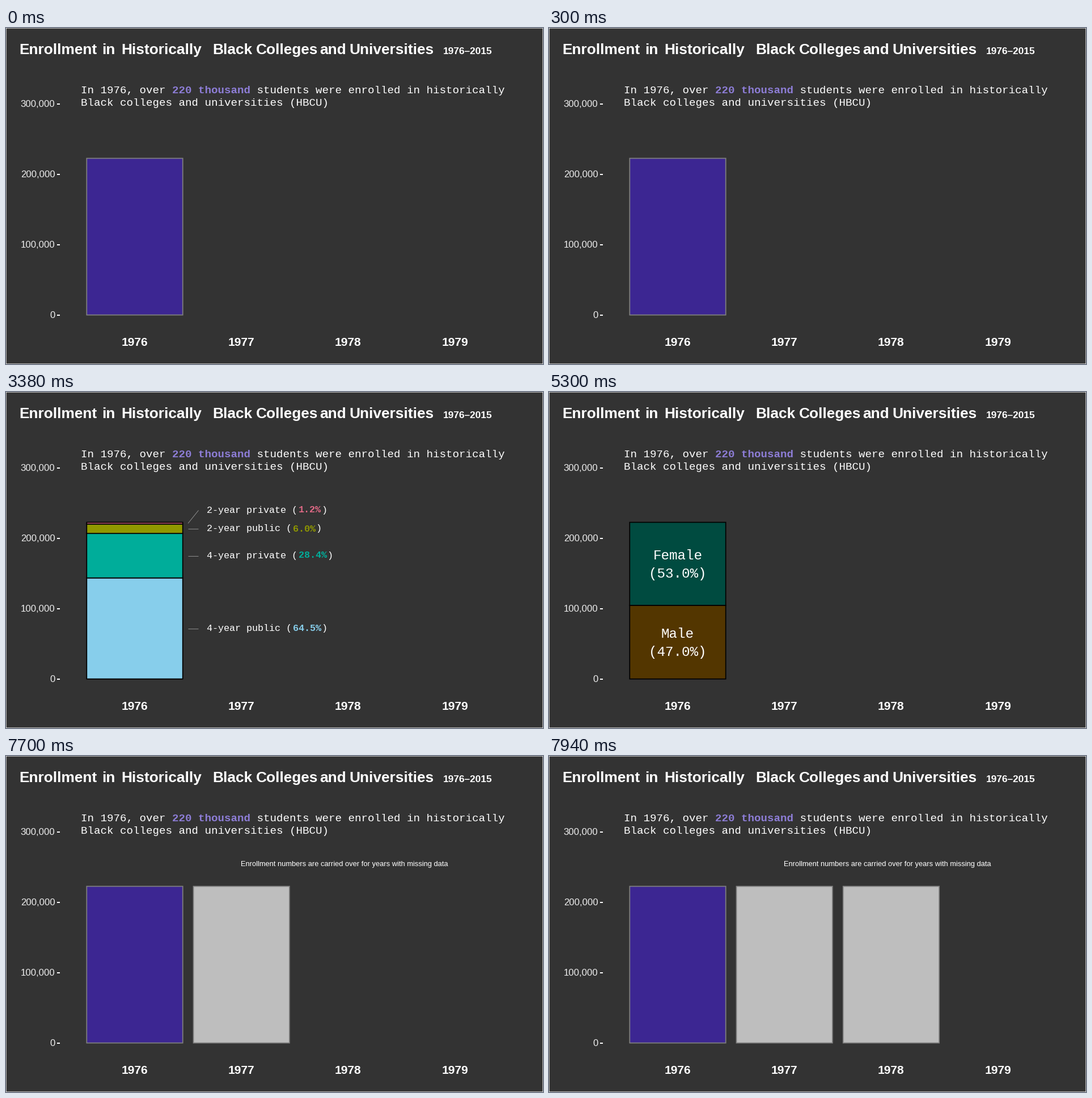
Write a matplotlib script that moves like this. It is 947 by 592 pixels and loops after 8000 ms.

```python
import matplotlib.pyplot as plt
from matplotlib.animation import FuncAnimation
from matplotlib.patches import Rectangle

W, H, DPI = 947, 592, 64
STEP, LOOP = 20, 8000          # ms
MONO, SANS = "Liberation Mono", "Liberation Sans"
WHITE, GREY, PURPLE = "#ffffff", "#7f7f7f", "#3c2692"
BASE, UNIT = 505.6, 124.0      # y of zero, pixels per 100,000
TOTAL = 276.0                  # bar height for 1976
FIRST, PITCH = 227.0, 188.2
BAR_W = 0.9 * PITCH

fig = plt.figure(figsize=(W / DPI, H / DPI), dpi=DPI, facecolor="#333333")
ax = fig.add_axes([0, 0, 1, 1])
ax.set_xlim(0, W)
ax.set_ylim(H, 0)
ax.axis("off")


def text(x, y, s, size, font=SANS, color=WHITE, bold=False, ha="left"):
    return ax.text(x, y, s, fontsize=size * 72 / DPI, family=font, color=color,
                   weight="bold" if bold else "normal", ha=ha, va="baseline")


def mono(x, y, size, before, strong, after, color):
    """One monospaced line with a bold coloured run inside it."""
    step = size * 0.6001
    x2 = x + len(before) * step
    x3 = x2 + len(strong) * step
    return [text(x, y, before, size, MONO),
            text(x2, y, strong, size, MONO, color, True),
            text(x3, y, after, size, MONO)]


def line(xs, ys, color, width):
    return ax.plot(xs, ys, color=color, lw=width * 72 / DPI,
                   solid_capstyle="butt")[0]


def bar(slot, low, high, fill, edge):
    """Bar piece; low and high are shares of the 1976 total."""
    x = FIRST + slot * PITCH - BAR_W / 2
    box = Rectangle((x, BASE - high * TOTAL), BAR_W, (high - low) * TOTAL,
                    fc=fill, ec=edge, lw=1.75 * 72 / DPI, joinstyle="miter",
                    snap=False)
    return ax.add_patch(box)


def draw_base():
    ax.add_patch(Rectangle((0, 0), W, H, fill=False, ec=WHITE,
                           lw=1.3 * 72 / DPI, snap=False))
    title = "Enrollment in Historically Black Colleges and Universities"
    starts = (23.5, 169, 203.5, 364, 440.5, 553.5, 605)
    for x, word in zip(starts, title.split()):
        text(x, 46, word, 26.2, bold=True)
    text(770.5, 46, "1976–2015", 17.2, bold=True)

    mono(132.5, 115, 19.1, "In 1976, over ", "220 thousand",
         " students were enrolled in historically", "#8d7dd6")
    text(132.5, 137, "Black colleges and universities (HBCU)", 19.1, MONO)

    for k in range(4):
        y = BASE - k * UNIT
        text(86.5, y + 5.8, f"{k * 100000:,}", 16.8, color="#ebebeb", ha="right")
        line([90, 95], [y, y], WHITE, 2)
        text(FIRST + k * PITCH, 559.5, str(1976 + k), 21, bold=True, ha="center")


def draw_types():
    parts = [("4-year public", 64.5, "#87ceeb", 416.5, 421),
             ("4-year private", 28.4, "#00ad9a", 288.5, 292.5),
             ("2-year public", 6.0, "#909800", 241.0, 245.5),
             ("2-year private", 1.2, "#e16a86", 208.5, 212.5)]
    out, low = [], 0.0
    for name, pct, color, y, baseline in parts:
        high = min(low + pct / 100, 1)
        out.append(bar(0, low, high, color, "#000000"))
        y0 = 231.5 if pct < 2 else y
        out.append(line([321, 339.5], [y0, y], "#8c8c8c", 1))
        out += mono(354.3, baseline, 16.8, name + " (", f"{pct:.1f}%", ")", color)
        low = high
    return out


def draw_sexes():
    out = []
    for name, low, high, fill, y in (("Male", 0, 0.47, "#533600", 433),
                                     ("Female", 0.47, 1, "#004b40", 295)):
        out.append(bar(0, low, high, fill, "#000000"))
        out.append(text(FIRST, y, name, 24.3, MONO, ha="center"))
        share = f"({(high - low) * 100:.1f}%)"
        out.append(text(FIRST, y + 32.5, share, 24.3, MONO, ha="center"))
    return out


draw_base()
total = [bar(0, 0, 1, PURPLE, GREY)]
types = draw_types()
sexes = draw_sexes()
carried = [bar(1, 0, 1, "#bebebe", GREY),
           text(414.5, 194, "Enrollment numbers are carried over for years "
                "with missing data", 12.85)]
carried_next = [bar(2, 0, 1, "#bebebe", GREY)]

# artists with the spans (ms) in which they show
SCENES = [(total, [(0, 500), (7700, LOOP)]),
          (types, [(500, 5300)]),
          (sexes, [(5300, 7700)]),
          (carried, [(7700, LOOP)]),
          (carried_next, [(7940, LOOP)])]


def update(i):
    t = i * STEP
    for artists, spans in SCENES:
        on = any(a <= t < b for a, b in spans)
        for artist in artists:
            artist.set_visible(on)
    return []


anim = FuncAnimation(fig, update, frames=LOOP // STEP, interval=STEP,
                     init_func=lambda: update(0), repeat=True, repeat_delay=0)
plt.show()
```
